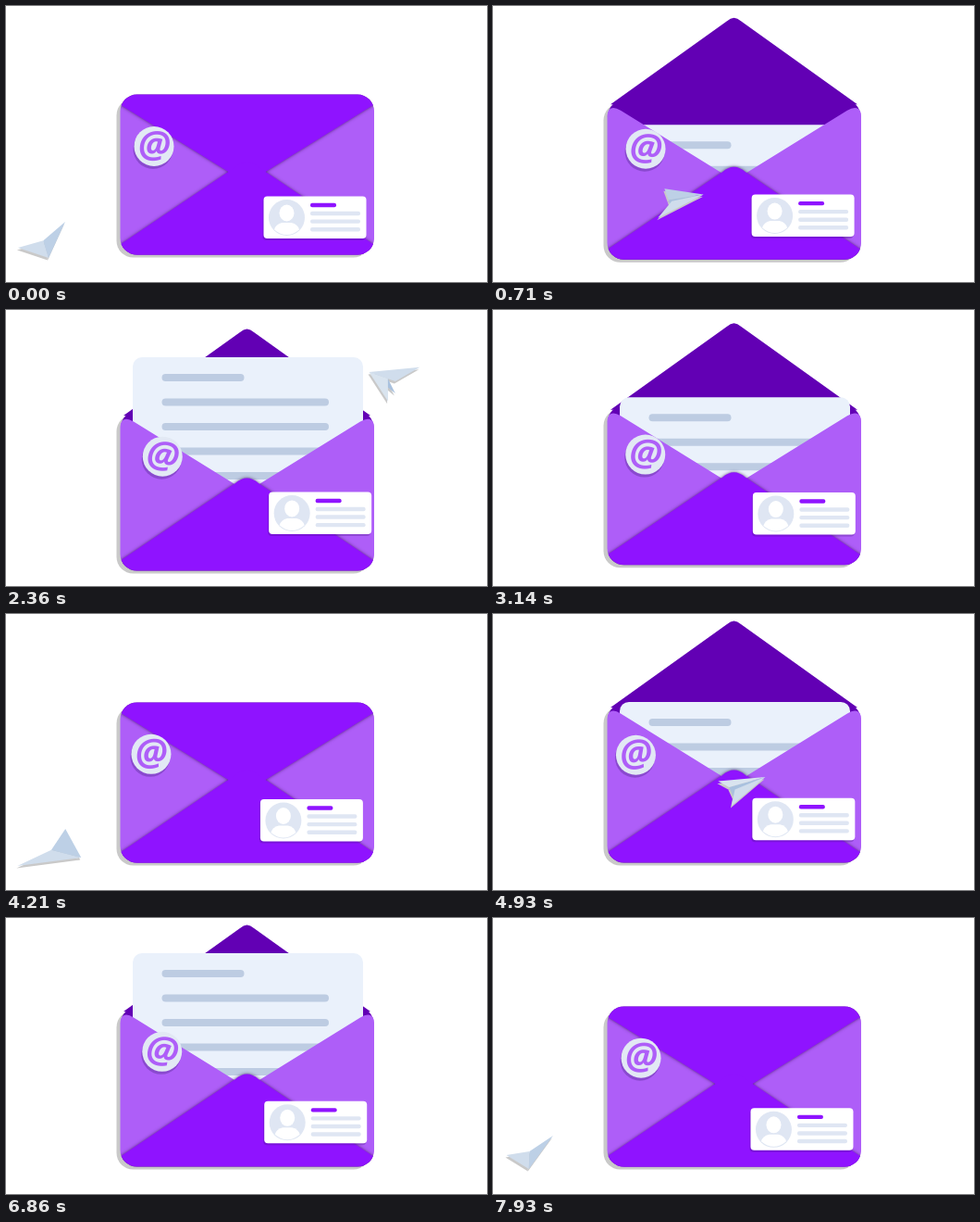
Recreate the animation shown at these times as an HTML page with a canvas. Size 520 by 298 pixels, loop 8 s.

```html
<!DOCTYPE html>
<html lang="en">
<head>
<meta charset="utf-8">
<title>Mail</title>
<style>
html, body { margin: 0; width: 100%; height: 100%; overflow: hidden; background: #fff; }
canvas { display: block; }
</style>
</head>
<body>
<canvas id="stage" width="520" height="298"></canvas>
<script>
const ctx = document.getElementById('stage').getContext('2d');
const LOOP = 8000, CYCLE = 4000;
const BRIGHT = '#8f13ff', LIGHT = '#ae5ef8', DARK = '#6200b4', GREY = '#c9c9c9';
const PAPER = '#eaf1fb', LINE = '#bdcce2', PALE = '#dfe6f3';
const POCKET = 'M120 260L248 174Q260.5 163 273 174L401 260V275H120Z';

// The badge and the card drift through points evenly spaced over the loop.
const evenly = points => points.map((p, i) => [i * LOOP / points.length, ...p]);
const badgePath = evenly([[160, 151.5], [170, 156], [168, 158], [158, 151.5], [155, 152], [169, 144]]);
const cardPath = evenly([[278.5, 205.5], [281, 200.5], [284, 196], [274.5, 200], [282.5, 198], [279.5, 197]]);

// Turning poses of the plane: time, nose, left wing tip, right wing tip.
const planePath = [
  [0, 46, 272, 64, 233, 13, 261],
  [210, 81, 263, 64, 232, 12, 272],
  [1430, 431, 116, 367, 143, 427, 153],
  [1790, 457, 86, 414, 117, 488, 93],
  [2350, 395, 66, 415, 98, 450, 61],
  [3710, 38, 257, 80, 237, 34, 236]
];

// Smooth periodic curve through rows of time and values.
function spline(keys, t, period) {
  const n = keys.length;
  const key = (i, c) => keys[(i + n) % n][c] + (c ? 0 : Math.floor(i / n) * period);
  let i = n - 1;
  while (keys[i][0] > t) i--;
  const span = key(i + 1, 0) - key(i, 0), u = (t - key(i, 0)) / span, v = 1 - u;
  const slope = (j, c) => (key(j + 1, c) - key(j - 1, c)) / (key(j + 1, 0) - key(j - 1, 0)) * span;
  return keys[0].slice(1).map((_, k) => {
    const c = k + 1;
    return key(i, c) * (1 + 2 * u) * v * v + slope(i, c) * u * v * v
      + key(i + 1, c) * u * u * (3 - 2 * u) - slope(i + 1, c) * u * u * v;
  });
}

const ramp = (t, from, to) => Math.min(1, Math.max(0, (t - from) / (to - from)));

function ease(t, from, to) {
  const p = ramp(t, from, to);
  return p * p * (3 - 2 * p);
}

function box(color, x, y, w, h, r) {
  ctx.fillStyle = color;
  ctx.beginPath();
  ctx.roundRect(x, y, w, h, r);
  ctx.fill();
}

function disc(color, x, y, r, ry = r) {
  ctx.fillStyle = color;
  ctx.beginPath();
  ctx.ellipse(x, y, r, ry, 0, 0, Math.PI * 2);
  ctx.fill();
}

function shape(color, path) {
  ctx.fillStyle = color;
  ctx.fill(new Path2D(path));
}

function shaded(color, path) {
  ctx.shadowColor = 'rgba(60,20,90,.8)';
  ctx.shadowBlur = 3.5;
  shape(color, path);
  ctx.shadowColor = 'transparent';
}

function drawLetter(p) {
  const y = 38 + 85 * (1 - ease(p, 700, 1300) + ease(p, 2900, 3335));
  box(PAPER, 137, y, 249, 140, 10);
  for (let i = 0; i < 5; i++) {
    const width = i ? 180.5 * (i < 4 ? 1 : ramp(p, 1300, 1560)) : 89;
    if (width) box(LINE, 168.5, y + 18 + i * 26.5, width, 8, 4);
  }
}

function drawEnvelope(p, drop) {
  const fold = -1 + 2 * (ease(p, 230, 680) - ease(p, 3320, 3800));
  ctx.save();
  ctx.translate(0, drop);
  box(GREY, 119.5, 100, 274, 171.5, 18);
  box(DARK, 124, 96, 273.5, 172, 18);
  if (fold > 0) {
    const y = v => 101 + (v - 101) * fold;
    shape(DARK, `M127 101L253 ${y(11)}Q260.5 ${y(4)} 268 ${y(11)}L394 101Z`);
  }
  drawLetter(p);

  ctx.beginPath();
  ctx.roundRect(123.5, 95.5, 274.5, 173, 18);
  ctx.clip();
  shape(LIGHT, 'M123 112Q126 100 138 107.5L261 183.5L123 270Z');
  shape(LIGHT, 'M399 112Q395 100 383 107.5L260 183.5L399 270Z');
  shaded(BRIGHT, POCKET);
  if (fold < 0) {
    const y = v => 96 - (v - 96) * fold;
    shaded(BRIGHT, `M120 94V${y(104.5)}L250 ${y(185)}Q260.5 ${y(191.5)} 271 ${y(185)}L401 ${y(104.5)}V94Z`);
    shape(BRIGHT, POCKET);
  }
  ctx.restore();
}

function drawBadge(t) {
  const [x, y] = spline(badgePath, t, LOOP);
  disc('rgba(80,40,140,.38)', x - 1, y + 3, 21.5);
  disc('#e2e9f4', x, y, 21.5);
  ctx.save();
  ctx.translate(x, y);
  ctx.rotate((x - 159) * Math.PI / 180);
  ctx.fillStyle = LIGHT;
  ctx.font = 'italic 700 40px "Open Sans", "Noto Sans", sans-serif';
  ctx.textAlign = 'center';
  ctx.fillText('@', 0, 12);
  ctx.restore();
}

function drawCard(t) {
  const [x, y] = spline(cardPath, t, LOOP);
  ctx.save();
  ctx.translate(x, y);
  box('rgba(70,20,130,.3)', -1, 1.5, 111, 46, 4);
  box('#fff', 0, 0, 111, 45.5, 4);
  disc(PALE, 25, 23, 19.5);
  disc('#fff', 25, 18, 8, 9);
  shape('#fff', 'M11.5 36Q13 30 20 28.5H30Q37 30 38.5 36Q25 47 11.5 36Z');
  box(BRIGHT, 50.5, 7.3, 28, 4.4, 2);
  for (let i = 0; i < 3; i++) box(PALE, 50.5, 16.3 + i * 8.6, 54, 4.4, 2);
  ctx.restore();
}

function drawPlane(p) {
  const [nx, ny, lx, ly, rx, ry] = spline(planePath, p, CYCLE);
  // The keel opens while the plane is seen from below.
  const open = ease(p, 290, 1200) * (1 - ease(p, 2500, 3300));
  const mx = (lx + rx) * .375 + nx * .25, my = (ly + ry) * .375 + ny * .25;
  const fx = mx - 8 * open, fy = my - 3 * open;
  const face = (color, ax, ay, bx, by) => shape(color, `M${nx} ${ny}L${ax} ${ay}L${bx} ${by}Z`);
  const paint = (keel, right, left) => {
    face(keel, fx, fy, mx, my + 5 + 8 * open);
    face(right, rx, ry, mx, my);
    face(left, lx, ly, fx, fy);
  };
  ctx.save();
  ctx.translate(-1, 2.5);
  paint(GREY, GREY, GREY);
  ctx.restore();
  paint('#a9c1de', '#d0ddec', open > .5 ? '#d9e4ef' : '#bdd0e6');
}

function draw() {
  const t = performance.now() % LOOP, p = t % CYCLE;
  const drop = 15.5 * Math.min(ramp(t, 0, 2060), ramp(t, CYCLE, 2060));
  const front = p > 290 && p < 2100;
  ctx.clearRect(0, 0, 520, 298);
  if (!front) drawPlane(p);
  drawEnvelope(p, drop);
  drawBadge(t);
  drawCard(t);
  if (front) drawPlane(p);
  requestAnimationFrame(draw);
}
draw();
</script>
</body>
</html>
```
